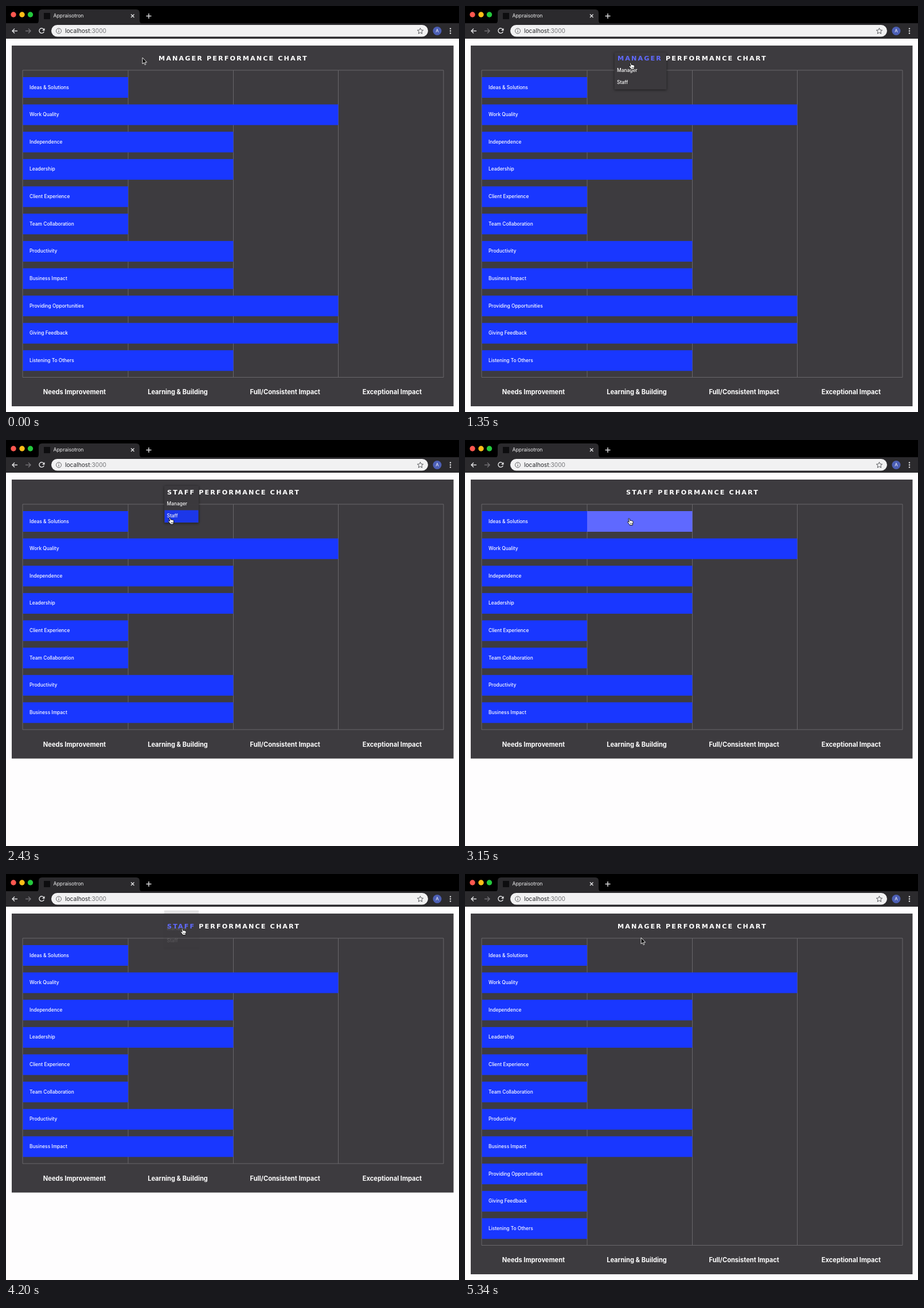
Write an HTML page that moves like this. It is 790 px wide and 708 px high and loops after 5.4 s.

```html
<!DOCTYPE html>
<html lang="en">
<head>
<meta charset="utf-8">
<title>Performance chart</title>
<style>
  html, body { margin: 0; width: 100%; height: 100%; overflow: hidden; background: #fefdfe; }
  svg { display: block; width: 790px; height: 708px; font-family: Inter, Roboto, sans-serif; }
  .label { font-size: 8.4px; font-weight: 500; fill: #fff; }
  .column { font-size: 11.1px; font-weight: 700; fill: #fff; text-anchor: middle; }
  .title { font: 700 11.2px "DejaVu Sans", sans-serif; letter-spacing: 2.1px; fill: #fff; }
  .grid { fill: none; stroke: #69676b; stroke-width: 1; }
  .icon { fill: none; stroke: #e4e4e6; stroke-width: 1.4; }
  #sheet { filter: drop-shadow(0 1px 2px rgba(0, 0, 0, .55)); }
</style>
</head>
<body>
<svg viewBox="0 0 790 708">
  <rect width="790" height="708" fill="#fefdfe"/>
  <g id="chrome">
    <rect width="790" height="32" fill="#000"/>
    <rect y="30" width="790" height="27" fill="#2b2a2d"/>
    <path d="M51 31q6 0 6-6V12q0-6 6-6H227q6 0 6 6V25q0 6 6 6z" fill="#2b2a2d"/>
    <circle cx="13" cy="15" r="4.7" fill="#ff5850"/>
    <circle cx="28" cy="15" r="4.7" fill="#ffbd18"/>
    <circle cx="42.500" cy="15" r="4.700" fill="#24c93c"/>
    <rect x="66" y="12" width="11" height="11" fill="#0d0d0f"/>
    <text x="82.500" y="20.300" font-size="8.700" fill="#f1f1f2">Appraisotron</text>
    <path class="icon" d="M218 14.500l5.500 5.500m0-5.500l-5.500 5.500"/>
    <path class="icon" stroke-width="1.700" d="M244.500 17.500h9m-4.500-4.500v9"/>
    <path class="icon" d="M20 43.500h-9m4-4l-4 4 4 4"/>
    <path class="icon" style="stroke:#737276" d="M34 43.500h9m-4-4l4 4-4 4"/>
    <path class="icon" d="M66 41a4.300 4.300 0 1 0 .3 3.500"/>
    <path d="M67.500 38.500v4.500h-4.500z" fill="#e4e4e6"/>
    <rect x="79" y="33" width="657" height="20.500" rx="10.250" fill="#f1f1f2"/>
    <circle cx="92" cy="43.500" r="4.500" fill="none" stroke="#5f6063"/>
    <path d="M92 43v3m0-5.200v1.100" stroke="#5f6063" stroke-width="1.100"/>
    <text x="103" y="47" font-size="10.200" fill="#222326">localhost<tspan fill="#737477">:3000</tspan></text>
    <path d="M722.500 38.500l1.500 3.300 3.600.4-2.700 2.400.8 3.600-3.200-1.900-3.200 1.900.8-3.600-2.700-2.400 3.600-.4z" fill="none" stroke="#55565a"/>
    <circle cx="752" cy="43.500" r="7.500" fill="#4c5fb5"/>
    <text x="752" y="46.400" font-size="8" fill="#fff" text-anchor="middle">A</text>
    <g fill="#e4e4e6">
      <circle cx="775" cy="39.500" r="1.200"/><circle cx="775" cy="43.500" r="1.200"/><circle cx="775" cy="47.500" r="1.200"/>
    </g>
  </g>

  <rect id="panel" x="10" y="69" width="770.5" fill="#3d3b3f"/>
  <path id="grid" class="grid"/>
  <g id="rows"></g>
  <rect id="cell" x="213" y="124" width="183.500" height="36" fill="#5f69ff"/>
  <g id="columns"></g>

  <g id="menu">
    <rect id="sheet" y="81" height="64.500" fill="#3b393d"/>
    <rect id="managerItem" y="102" height="21.500" fill="#1937ff"/>
    <rect id="staffItem" y="123.500" height="21.500" fill="#1937ff"/>
    <text id="managerText" class="label" y="115.200">Manager</text>
    <text id="staffText" class="label" y="136.400">Staff</text>
  </g>
  <text id="title" class="title" y="94.500"><tspan id="word"></tspan> PERFORMANCE CHART</text>

  <g id="cursor" stroke-linejoin="round">
    <path id="arrow" d="M0 0V11l2.500-2.300 1.700 3.900 1.700-.7-1.700-3.800H7.600z" fill="#000" stroke="#fff" stroke-width=".9"/>
    <g id="hand">
      <path d="M-1.500.8c-.2-1.300 1.500-1.500 1.900-.3l1 3.300c.3-.7 1.600-.7 1.800.2 .5-.6 1.700-.4 1.800.4 .6-.4 1.600-.1 1.600.9 .1 1.600.1 2.800-.5 4l-.4 2.200h-5l-.4-1.200-3.200-3.800c-.6-1 .5-1.800 1.400-1.100l1.300 1z" fill="#fff" stroke="#000" stroke-width=".9"/>
      <path d="M2 7.500v2.300m1.500-2.300v2.300m1.500-2.300v2.300" stroke="#000" stroke-width=".6"/>
    </g>
  </g>
</svg>
<script>
const LOOP = 5400, TO_STAFF = 2400, TO_MANAGER = 5040;
const EDGES = [29, 213, 396.5, 579.5, 763];
const COLUMNS = ["Needs Improvement", "Learning & Building", "Full/Consistent Impact", "Exceptional Impact"];
const SKILLS = [
  ["Ideas & Solutions", 1], ["Work Quality", 3], ["Independence", 2], ["Leadership", 2],
  ["Client Experience", 1], ["Team Collaboration", 1], ["Productivity", 2], ["Business Impact", 2],
  ["Providing Opportunities", 3], ["Giving Feedback", 3], ["Listening To Others", 2]
];
const STAFF_ROWS = 8;

// Cursor path as [time, x, y], eased between stops.
const PATH = [
  [0, 238, 90], [240, 238, 90], [720, 287, 92], [1050, 289, 99], [1500, 289, 99],
  [1960, 286, 135.5], [2500, 286, 135.5], [2900, 286.5, 137], [3170, 286.5, 137],
  [3500, 303, 104], [3900, 308, 101], [4040, 308, 99], [4130, 307.5, 95],
  [4500, 307.5, 95], [4760, 307, 111], [5400, 307, 111]
];

const $ = id => document.getElementById(id);
const set = (node, attrs) => { for (const k in attrs) node.setAttribute(k, attrs[k]); };
const add = (parent, tag, attrs, text = "") => {
  const node = document.createElementNS("http://www.w3.org/2000/svg", tag);
  set(node, attrs);
  node.textContent = text;
  return parent.appendChild(node);
};
const ramp = (t, start, length) => {
  const p = Math.min(1, Math.max(0, (t - start) / length));
  return p * p * (3 - 2 * p);
};
const pulse = (t, from, to, length) => ramp(t, from, length) - ramp(t, to, length);
const within = (t, from, to) => t >= from && t < to;
const show = (id, visible) => set($(id), { visibility: visible ? "visible" : "hidden" });
const mix = (a, b, p) => `rgb(${a.map((v, i) => Math.round(v + (b[i] - v) * p))})`;

const rows = SKILLS.map(([name], i) => {
  const g = add($("rows"), "g", { transform: `translate(0 ${124 + 47.63 * i})` });
  const bar = add(g, "rect", { x: 29.5, height: 36, fill: "#1937ff" });
  add(g, "text", { class: "label", x: 41, y: 20.6 }, name);
  return { g, bar };
});
COLUMNS.forEach((name, i) => add($("columns"), "text", {
  class: "column", x: [119.5, 299.5, 486.7, 673.5][i], y: 677
}, name));

function cursorAt(t) {
  const i = PATH.findIndex(stop => stop[0] > t);
  const [t0, x0, y0] = PATH[i - 1], [t1, x1, y1] = PATH[i];
  const p = ramp(t, t0, t1 - t0);
  return [x0 + (x1 - x0) * p, y0 + (y1 - y0) * p];
}

function drawChart(t, staff) {
  const bottom = staff ? 505 : 647.5;
  set($("panel"), { height: bottom - 18.5 });
  set($("grid"), {
    d: `M29 112H763V${bottom}H29Z` + EDGES.slice(1, 4).map(x => `M${x} 112V${bottom}`).join("")
  });
  set($("columns"), { transform: `translate(0 ${staff ? -142.5 : 0})` });
  rows.forEach(({ g, bar }, i) => {
    const extra = i >= STAFF_ROWS;
    const level = extra && t >= TO_MANAGER ? 1 : SKILLS[i][1];
    set(g, { visibility: staff && extra ? "hidden" : "visible" });
    set(bar, { width: EDGES[level] - 29.5 });
  });
  set($("cell"), { opacity: pulse(t, 2600, 3300, 100) });
}

function drawMenu(t, staff) {
  const open = pulse(t, 1050, TO_STAFF, 220) + pulse(t, 4150, TO_MANAGER, 220);
  const left = staff ? 276 : 260.5, width = staff ? 60 : 91;
  set($("menu"), { opacity: open, transform: `translate(0 ${-20 * (1 - open)})` });
  set($("sheet"), { x: left, width });
  for (const id of ["managerItem", "staffItem"]) set($(id), { x: left + .5, width: width - 1 });
  for (const id of ["managerText", "staffText"]) set($(id), { x: left + 4.5 });
  set($("managerItem"), { opacity: pulse(t, 1650, 1910, 200) + pulse(t, 4640, TO_MANAGER, 200) });
  set($("staffItem"), { opacity: pulse(t, 1910, TO_STAFF, 200) });

  const lit = pulse(t, 650, TO_STAFF - 120, 120) + pulse(t, 4050, 4700, 120);
  set($("title"), { x: staff ? 281 : 266 });
  set($("word"), { fill: mix([255, 255, 255], [96, 106, 255], lit) });
  $("word").textContent = staff ? "STAFF" : "MANAGER";
}

function draw(t) {
  const staff = within(t, TO_STAFF, TO_MANAGER);
  drawChart(t, staff);
  drawMenu(t, staff);
  const hand = within(t, 650, 3300) || within(t, 4050, 5160);
  show("hand", hand);
  show("arrow", !hand);
  set($("cursor"), { transform: `translate(${cursorAt(t)})` });
}

const start = performance.now();
function tick() {
  draw((performance.now() - start) % LOOP);
  requestAnimationFrame(tick);
}
tick();
</script>
</body>
</html>
```
